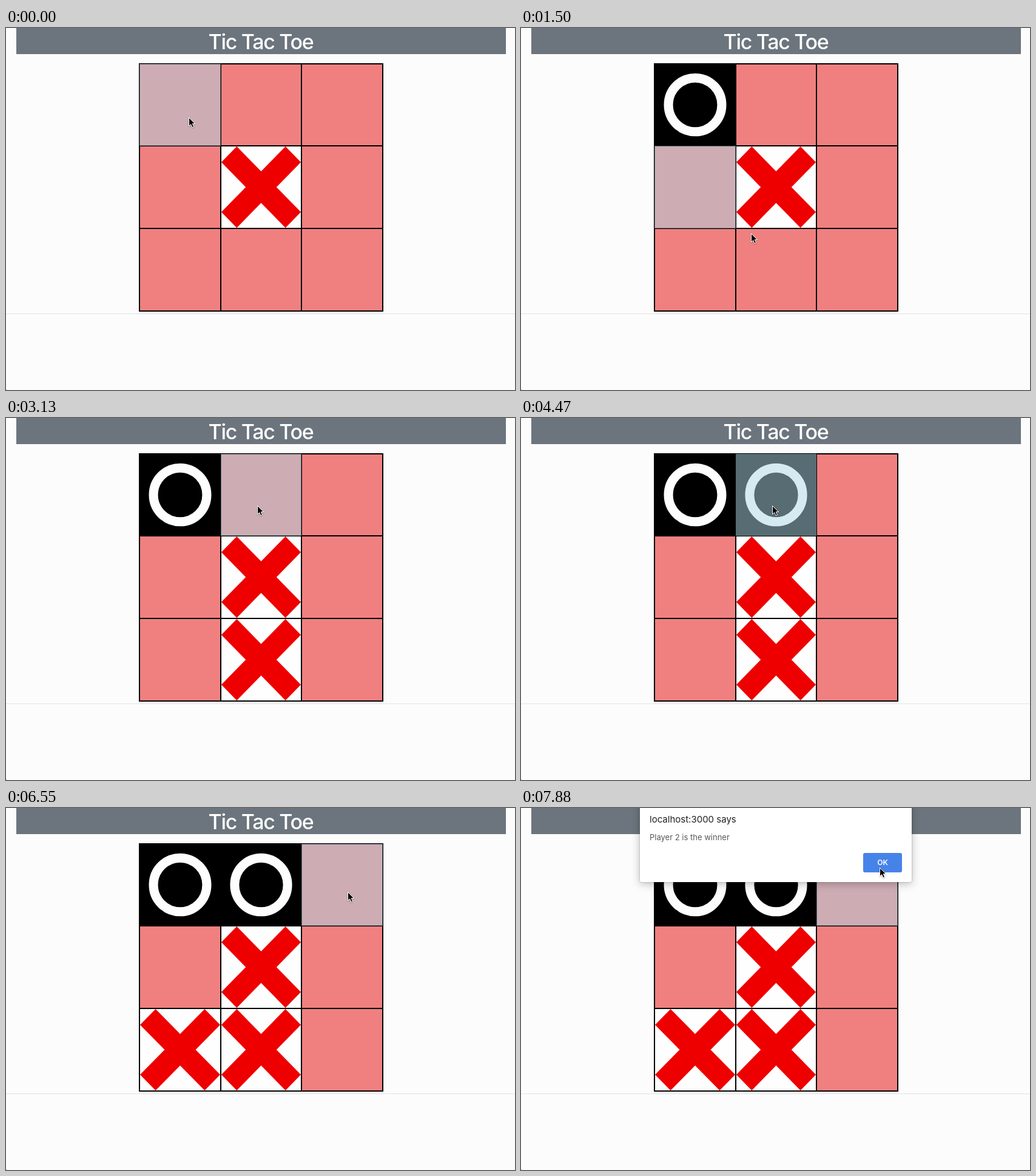
Write an HTML page that moves like this. It is 839 by 596 pixels and loops after 8000 ms.

```html
<!DOCTYPE html>
<html lang="en">
<head>
<meta charset="utf-8">
<title>Tic Tac Toe</title>
<style>
  html, body { margin: 0; width: 100%; height: 100%; overflow: hidden; background: #fcfcfc; }
  svg { display: block; }
  text { font-family: Inter, Roboto, sans-serif; }
  #marks { color: #e00; }
  #marks .hovered { color: #f9221a; }
  #dialogBox { filter: drop-shadow(0 0 1px rgba(0, 0, 0, .3)) drop-shadow(0 3px 7px rgba(0, 0, 0, .25)); }
  #cursor { filter: drop-shadow(0 1px 1px rgba(0, 0, 0, .3)); }
</style>
</head>
<body>
<svg width="839" height="596" viewBox="0 0 839 596">
  <defs>
    <g id="X">
      <rect x="-1" y="-1" width="2" height="2" fill="#fefefe"/>
      <path fill="currentColor" d="M-1-.613-.613-1 0-.387 .613-1 1-.613 .387 0 1 .613 .613 1 0 .387-.613 1-1 .613-.387 0Z"/>
    </g>
    <g id="O">
      <rect x="-1" y="-1" width="2" height="2"/>
      <circle r=".666" fill="none" stroke="#fdfdfd" stroke-width=".228"/>
    </g>
  </defs>
  <rect width="839" height="596" fill="#fcfcfc"/>
  <rect x="17" width="807" height="43" fill="#6c757d"/>
  <text x="420" y="35" font-size="34" font-weight="550" letter-spacing="-1.3" text-anchor="middle" fill="#fff">Tic Tac Toe</text>
  <rect y="470" width="839" height="1" fill="#e3e3e3"/>
  <rect y="595" width="1" height="1" fill="#888"/>
  <rect x="220" y="59" width="401" height="407" fill="#f08080"/>
  <g id="marks"></g>
  <path d="M220 58V467M354 58V467M487 58V467M621 58V467M219 59H622M219 194H622M219 330H622M219 466H622" stroke="#000" stroke-width="2"/>
  <rect id="hover" fill="lightblue" opacity=".5"/>
  <g id="dialog">
    <rect id="dialogBox" x="196" y="-10" width="448" height="132" rx="3" fill="#fff"/>
    <text x="212" y="24" font-size="15" fill="#202124">localhost:3000 says</text>
    <text x="212" y="53" font-size="13" fill="#55585c">Player 2 is the winner</text>
    <rect x="564" y="74" width="64" height="32" rx="3" fill="#4683e9"/>
    <text x="596" y="94" font-size="12" font-weight="600" text-anchor="middle" fill="#fff">OK</text>
  </g>
  <path id="cursor" d="M.5.5V14.5L3.7 11.6 6 16.7 8.5 15.6 6.3 10.6H10.6Z" stroke="#fff"/>
</svg>
<script>
const LOOP = 8000;
const FRAME = 148.6; // the screen refreshes in steps of this many ms
const DIALOG_FRAME = 48;
const columns = [220, 354, 487, 621];
const rows = [59, 194, 330, 466];

const home = { x: 301, y: 147 };
const strokes = [
  { from: 5, to: 7, x: 310, y: 235 },
  { from: 8, to: 13, x: 398, y: 366 },
  { from: 19, to: 21, x: 414, y: 144 },
  { from: 32, to: 36, x: 310, y: 388 },
  { from: 41, to: 44, x: 563, y: 138 },
  { from: 50, to: 53, x: 591, y: 98 }
];
const clickFrames = [4, 16, 30, 41];

const byId = id => document.getElementById(id);
const easeOut = p => 1 - (1 - p) ** 3;

function setAttributes(element, attributes) {
  for (const name in attributes) element.setAttribute(name, attributes[name]);
}

function pointerAt(frame) {
  return strokes.reduce((point, { from, to, x, y }) => {
    const p = easeOut(Math.min(1, Math.max(0, (frame - from) / (to - from))));
    return { x: point.x + (x - point.x) * p, y: point.y + (y - point.y) * p };
  }, home);
}

function cellAt({ x, y }) {
  const column = columns.findLastIndex(edge => edge <= x);
  const row = rows.findLastIndex(edge => edge <= y);
  return {
    x: columns[column], y: rows[row],
    width: columns[column + 1] - columns[column],
    height: rows[row + 1] - rows[row]
  };
}

function addMark(kind, cell, frame) {
  const node = document.createElementNS('http://www.w3.org/2000/svg', 'use');
  const halfWidth = cell.width / 2, halfHeight = cell.height / 2;
  setAttributes(node, {
    href: '#' + kind,
    transform: `translate(${cell.x + halfWidth} ${cell.y + halfHeight}) scale(${halfWidth - 1} ${halfHeight - 1})`
  });
  byId('marks').append(node);
  return { node, cell, frame };
}

// The game opens with X in the centre; each click then fills the cell under the pointer.
const marks = [
  addMark('X', cellAt({ x: 420, y: 262 }), 0),
  ...clickFrames.map((frame, i) => addMark('OX'[i % 2], cellAt(pointerAt(frame)), frame))
];

function draw(time) {
  const frame = Math.floor(time / FRAME);
  const { x, y } = pointerAt(frame);
  const hovered = cellAt(pointerAt(frame - 1)); // the highlight lags one refresh behind
  for (const mark of marks) {
    mark.node.style.display = frame >= mark.frame ? '' : 'none';
    mark.node.classList.toggle('hovered', mark.cell.x === hovered.x && mark.cell.y === hovered.y);
  }
  setAttributes(byId('hover'), hovered);
  setAttributes(byId('cursor'), { transform: `translate(${Math.round(x)} ${Math.round(y)})` });
  byId('dialog').style.opacity = frame < DIALOG_FRAME ? 0 : frame === DIALOG_FRAME ? .7 : 1;
}

const start = performance.now();
function tick() {
  draw((performance.now() - start) % LOOP);
  requestAnimationFrame(tick);
}
tick();
</script>
</body>
</html>
```
